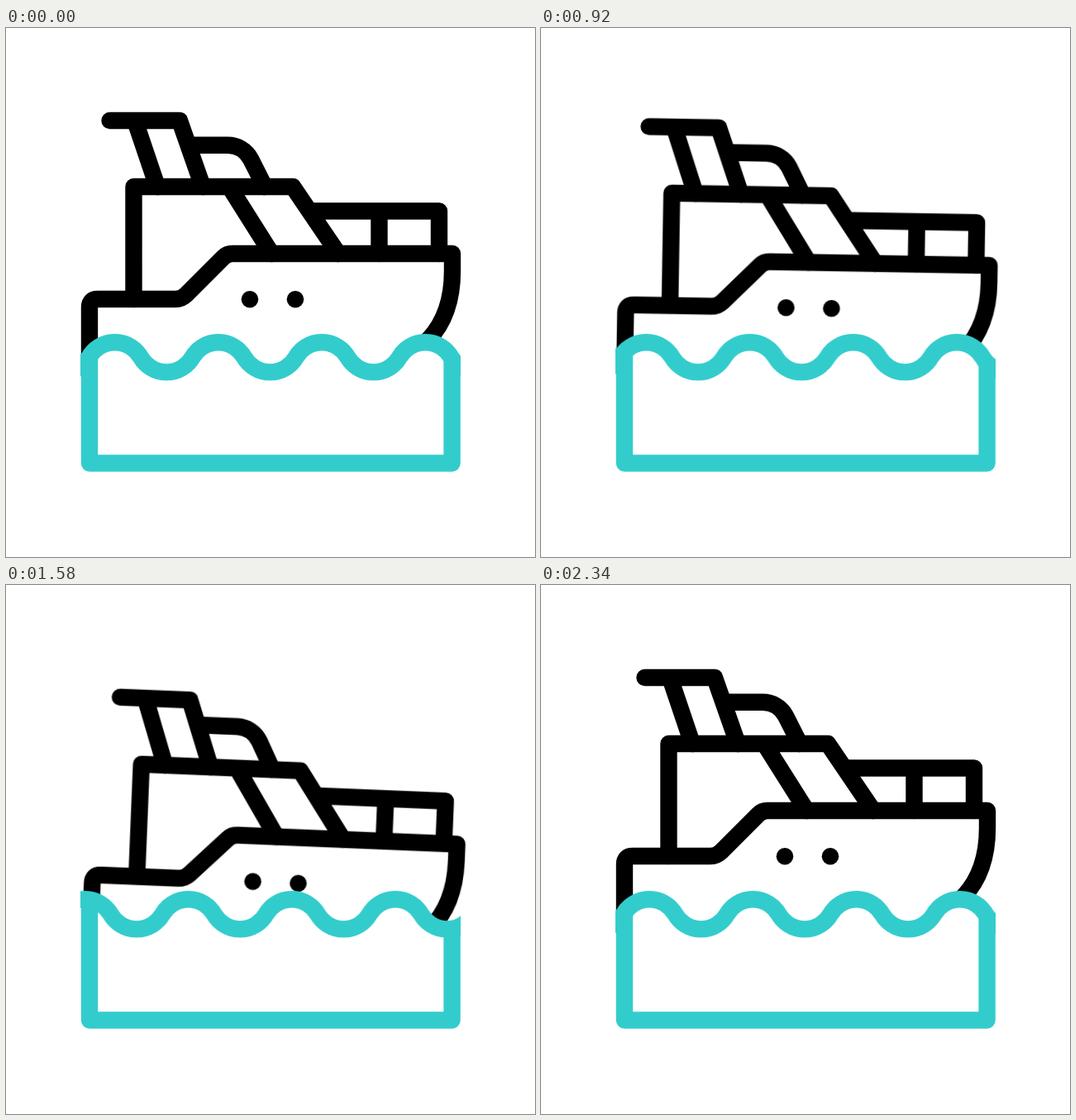
Recreate the animation shown at these times as an HTML page. Size 640 by 640 pixels, loop 2.4 s.

```html
<!DOCTYPE html>
<html lang="en">
<head>
<meta charset="utf-8">
<title>Yacht on waves</title>
<style>
  html, body { margin: 0; width: 100%; height: 100%; overflow: hidden; background: #fff; }
  svg { display: block; width: 100%; height: 100%; }
  path { fill: none; stroke-width: 20.4; stroke-linecap: round; stroke-linejoin: round; }

  .bob, .tilt, .wave {
    animation: 2400ms cubic-bezier(.333, 0, .667, 1) infinite;
  }
  .bob { animation-name: bob; }
  .tilt { animation-name: tilt; transform-origin: 320px 416px; stroke: #000; }
  .wave { animation-name: slide; }
  .water { stroke: #3cc; }
  .water .wave { fill: #fff; }

  @keyframes bob {
    0%, 93.3%, 100% { transform: translateY(0); }
    24.6% { transform: translateY(23.4px); }
    48.1% { transform: translateY(2.9px); }
    68.75% { transform: translateY(33px); }
  }
  @keyframes tilt {
    0%, 97.7%, 100% { transform: rotate(0deg); }
    17% { transform: rotate(6deg); }
    50.2% { transform: rotate(-1.1deg); }
    73.5% { transform: rotate(3.5deg); }
  }
  @keyframes slide {
    0%, .75% { transform: translateX(0); }
    96.1%, 100% { transform: translateX(-376.2px); }
  }
</style>
</head>
<body>
<svg viewBox="0 0 640 640">
  <defs>
    <clipPath id="tank"><rect x="90.7" y="350" width="459.1" height="190"/></clipPath>
    <clipPath id="below"><path class="wave"/></clipPath>
  </defs>

  <g class="bob">
    <g class="tilt">
      <!-- mast and canopy -->
      <path d="M125.5 112H210L238 192M156 112L183 192"/>
      <path d="M225 141.7H268C280 141.7 290.5 148 296 158.5L313 192"/>
      <!-- cabin and railing -->
      <path d="M154.5 328V192H347L402 273M270.2 192L321.3 273"/>
      <path d="M372 221.5H524V273M451.5 221.5V273"/>
      <!-- hull -->
      <path d="M101 425V338Q101 328 111 328H205Q212.5 328 218 322.5L263 277.5Q267.5 273 274 273H540V294C540 326 531 356 511 377L470 418"/>
      <g stroke="none">
        <circle cx="295" cy="328.2" r="10.3"/>
        <circle cx="350" cy="328.2" r="10.3"/>
      </g>
    </g>
  </g>

  <g class="water" clip-path="url(#tank)">
    <path class="wave"/>
    <path clip-path="url(#below)" d="M101 360V526.5H539.6V360"/>
  </g>
</svg>
<script>
  // Each period is a crest arc followed by a trough arc, 120 degrees each.
  const arc = sweep => `a36.15 36.15 0 0 ${sweep} 62.6 0`;
  const surface = 'M-24.8 398.3' + (arc(1) + arc(0)).repeat(8) + 'V600H-24.8Z';
  for (const wave of document.querySelectorAll('.wave')) wave.setAttribute('d', surface);
</script>
</body>
</html>
```
